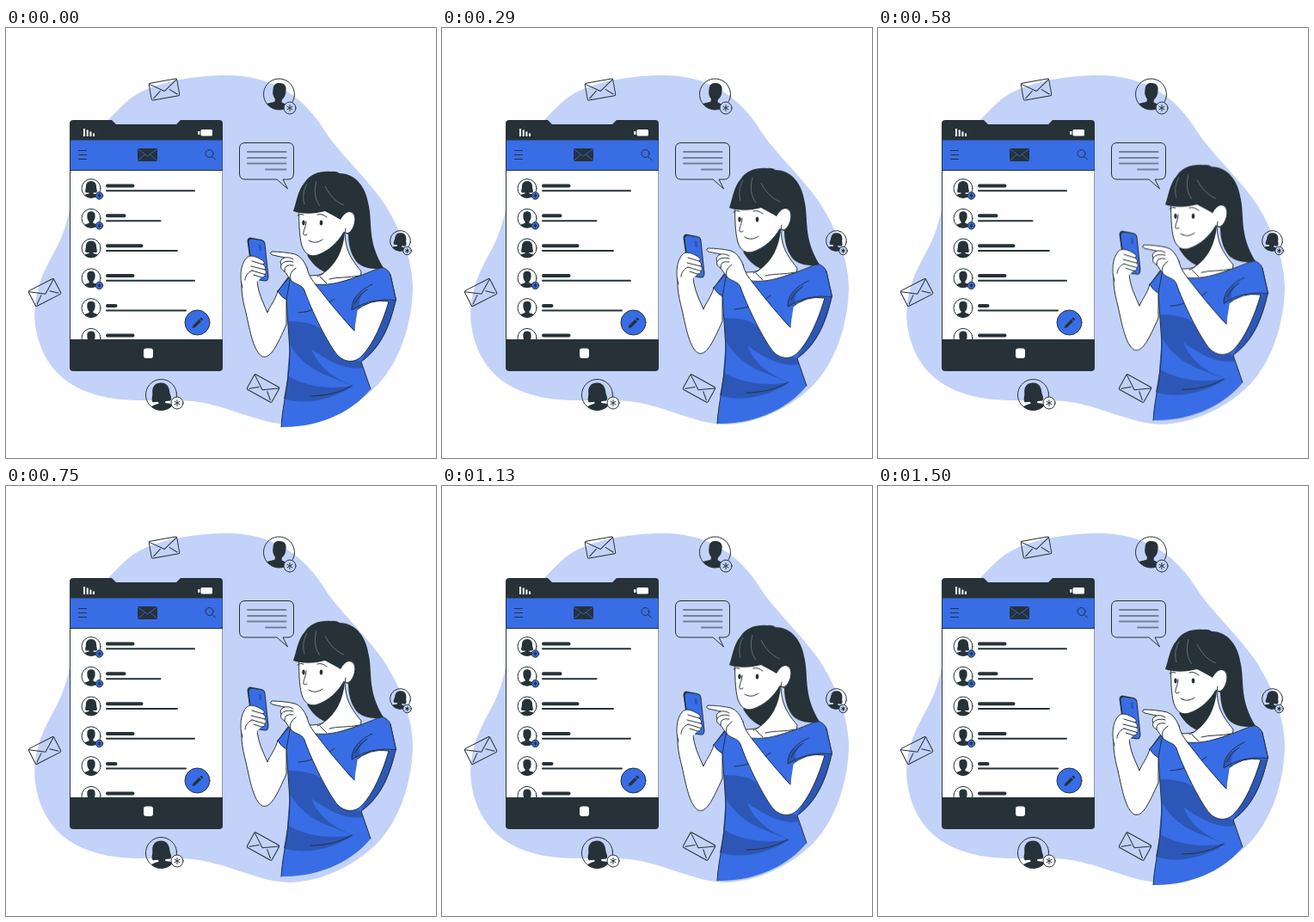
Write an HTML page without scripts that moves like this. It is 500 px wide and 500 px high and loops after 1.54 s.

```html
<!DOCTYPE html>
<html lang="en">
<head>
<meta charset="utf-8">
<title>Mobile inbox</title>
<style>
  html, body { margin: 0; width: 100%; height: 100%; overflow: hidden; background: #fff; }
  svg { display: block; width: 100%; height: 100%; --ink: #263238; --blue: #386de6; --shade: #2c57b6; --pale: #c3d2f8; }
  .ink { fill: var(--ink); }
  .blue { fill: var(--blue); }
  .shade { fill: var(--shade); }
  .pale { fill: var(--pale); }
  .white { fill: #fff; }
  .line { fill: none; }
  .line, .edge { stroke: var(--ink); stroke-width: 1; stroke-linecap: round; stroke-linejoin: round; vector-effect: non-scaling-stroke; }
  .bold { stroke-width: 4; }
  .thin { stroke-width: 2; }
  .woman { animation: float 1540ms linear infinite; }
  @keyframes float {
    0%, 97.4%, 100% { transform: translateY(0); }
    48.7% { transform: translateY(-10px); }
  }
</style>
</head>
<body>
<svg viewBox="0 0 500 500" xmlns="http://www.w3.org/2000/svg">
  <defs>
    <clipPath id="disc"><circle r="18"/></clipPath>
    <clipPath id="screen"><path d="M75 130H252V362H75Z"/></clipPath>
    <g id="man">
      <g clip-path="url(#disc)" class="ink">
        <path d="M-7.500-5C-8-11-4-13 0-13S8-11 7.500-5C8 1 6 4 4 6V9C8 11 12 11 14 14V20H-14V14C-12 11-8 11-4 9V6C-6 4-8 1-7.500-5Z"/>
      </g>
      <circle r="18" class="line"/>
    </g>
    <g id="lady">
      <g clip-path="url(#disc)" class="ink">
        <path d="M0-14C7-14 10-9 10-3C10 2 13 5 10 8L4 8V10C9 11 13 12 14 15V20H-14V15C-13 12-9 11-4 10V8L-10 8C-13 5-10 2-10-3C-10-9-7-14 0-14Z"/>
      </g>
      <circle r="18" class="line"/>
    </g>
    <g id="badge">
      <circle r="7" class="edge"/>
      <path class="line" d="M0-3.500V3.500M-3-1.800L3 1.800M-3 1.800L3-1.800"/>
    </g>
    <g id="letter" class="line">
      <rect x="-16.500" y="-10" width="33" height="20" rx="1.500"/>
      <path d="M-16-9L0 2L16-9M-14 8L-5 1M14 8L6 1"/>
    </g>
  </defs>

  <path class="pale" d="M258 55C305 55 342 76 367 114C383 141 411 165 437 200C461 236 473 272 473 305C471 353 453 400 421 425C396 446 362 460 330 461C292 460 263 440 218 434C180 430 142 438 103 426C66 415 40 389 34 345C30 310 43 284 58 257C77 222 75 190 88 155C98 129 117 107 140 86C162 65 213 55 258 55Z"/>

  <use href="#letter" transform="translate(184 71.500) rotate(-10)"/>
  <use href="#letter" transform="translate(45 307.500) rotate(-27)"/>
  <use href="#letter" transform="translate(299 419) rotate(29)"/>

  <use href="#man" transform="translate(317.500 77) rotate(6)"/>
  <use href="#badge" class="pale" x="330" y="93"/>
  <use href="#lady" transform="translate(180.500 426.500) rotate(-5)"/>
  <use href="#badge" class="white" x="199" y="436"/>
  <use href="#lady" transform="translate(458.500 247.500) scale(.66) rotate(8)"/>
  <use href="#badge" class="pale" transform="translate(466.500 259) scale(.68)"/>

  <!-- speech bubble -->
  <path class="line" d="M278 133.500H328Q334.500 133.500 334.500 140V169Q334.500 176 328 176H322L327.500 187L315 176H278Q271.500 176 271.500 169V140Q271.500 133.500 278 133.500Z"/>
  <path class="line thin" opacity=".5" d="M281 144H325.500M281 151H325.500M281 157.500H325.500M302 164.500H325.500"/>

  <!-- large phone -->
  <path class="ink" d="M78.500 107H123L128 112H198L203 107H248Q252 107 252 111V395Q252 399 248 399H78.500Q74 399 74 395V111Q74 107 78.500 107Z"/>
  <path class="blue" d="M75 130.500H251.500V165H75Z"/>
  <path class="white" d="M75 166H251.500V362H75Z"/>
  <g class="white">
    <path d="M90 117h2v9h-2zM93.700 118.500h2v7.500h-2zM97.400 120.500h2v5.500h-2zM101 122.500h2v3.500h-2z"/>
    <rect x="226.500" y="118" width="13.500" height="7.500" rx="1.500"/>
    <rect x="223" y="120" width="2.500" height="4" rx="1"/>
    <rect x="160" y="372.500" width="11" height="11.500" rx="3"/>
  </g>
  <path class="line" d="M84.500 142.500H93.500M84.500 147.500H93.500M84.500 152.500H93.500M239.500 149.500L244 153.500"/>
  <circle class="line" cx="236.500" cy="146" r="4.500"/>
  <path class="ink" d="M153 140H176V155H153Z"/>
  <path fill="none" stroke="var(--blue)" stroke-width=".8" d="M153 140.500L164.500 149L176 140.500M153 154.500L161.500 147M176 154.500L167.500 147"/>

  <g clip-path="url(#screen)">
    <use href="#lady" transform="translate(99 186.500) scale(.61)"/>
    <use href="#man" transform="translate(99 221.300) scale(.61)"/>
    <use href="#lady" transform="translate(99 256) scale(.61)"/>
    <use href="#man" transform="translate(99 290.800) scale(.61)"/>
    <use href="#man" transform="translate(99 325.600) scale(.61)"/>
    <use href="#man" transform="translate(99 360.400) scale(.61)"/>
  </g>
  <g class="blue">
    <use href="#badge" transform="translate(108.500 195) scale(.6)"/>
    <use href="#badge" transform="translate(108.500 229.800) scale(.6)"/>
    <use href="#badge" transform="translate(108.500 299.400) scale(.6)"/>
  </g>
  <path class="line bold" d="M118 183.500H147.500M118 218.300H137.500M118 253.200H157.500M118 288H147.500M118 323H127.500M118 357.500H147.500"/>
  <path class="line thin" d="M117 189.300H219M117 224.200H179.500M117 259H199M117 293.800H219M117 328.600H209"/>
  <circle class="blue edge" cx="222.500" cy="342.500" r="14.500"/>
  <path class="ink" d="M216.500 349L217.800 345.500L224.500 338.800L227 341.200L220.200 348ZM225.200 338L226.500 336.800Q227.200 336.400 228 337.200L229 338.200Q229.500 339 228.900 339.500L227.700 340.600Z"/>

  <g class="woman">
    <!-- neck and chest -->
    <path class="white edge" d="M394 238C395 254 397 264 413 283L412 292L372 303L343 295L352 288C364 288 371 286 371 282L380 255Z"/>
    <path class="line" d="M371 282C370 285 367 287 362 289M365 289L373 297M376 292C386 289 398 291 411 288"/>
    <path class="ink" d="M350 264C355 273 362 280 371 284C383 275 392 260 394 238L370 258Z"/>

    <!-- dress -->
    <path class="blue" d="M331 286L347 295C360 300 376 299 390 295C408 290 422 284 437 278Q445 281 447 287L453.500 316C447 340 440 368 413 388L424 420C405 444 367 465 320 464C321 440 330 410 330 375L326 316L316 306Z"/>
    <path class="shade" d="M328 341C346 341 359 344 366 350L384 380L413 388L415 395C396 399 372 386 355 373C362 391 376 405 404 416C378 433 348 439 323 431C329 405 331 370 328 341Z"/>
    <path class="blue" d="M330 368C339 384 355 398 378 406L403 416C373 421 346 416 327 404Z"/>
    <path class="shade" d="M318 304L330 288L326 300L327 315ZM445 318L453 317C448 346 434 375 413 388Z"/>
    <path class="line" d="M320 464C321 440 330 410 330 375L326 316M331 286L347 295C360 300 376 299 390 295C408 290 422 284 437 278Q445 281 447 287L453.500 316C447 340 440 368 413 388L424 420M340 331C355 330 369 324 382 315M354 428C372 428 388 424 402 416M316 306L331 286M322 307L332 289"/>

    <!-- left arm -->
    <path class="white edge" d="M316 306C313 317 307 323 304 331C299 319 292 306 292 291L277 286C271 297 275 316 279 331C284 354 288 376 298 382C308 385 315 369 326 345L326 316Z"/>
    <path class="blue edge" d="M316 306L331 288L326 316Q320 313 316 306Z"/>

    <!-- phone in hand -->
    <path class="ink" d="M280.500 248Q280.500 244 284 243.500L297 246Q301 247 301.500 251L305.500 289Q305.500 294.500 301 294.500L291 293Q287 292 286 288Z"/>
    <path class="blue" d="M282.500 249Q282.500 245.500 286 245.500L297 247.300Q300 248 300.500 251L304.500 289Q304.500 293.500 301 293.500L292 292Q288 291 287.500 288Z"/>
    <path class="shade" d="M293.500 251.500L296.500 252L297.300 259L294.500 258.500Z"/>
    <path class="white" d="M273 294C271 285 274 274 279 268C283 263 290 265 298 270Q302 273 299 275Q303 278 301 281Q304 284 301 286.500Q302 290 297 290L292 295L276 302Z"/>
    <path class="line" d="M275 302C271 290 273 275 279 268C283 263 290 265 298 270Q302 273 299 275L286 271M299 275Q303 278 301 281L285 277M301 281Q304 284 301 286.500L286 282M301 286.500Q302 290 297 290L288 287M286 282C281 284 278 289 278 293"/>

    <!-- right arm and pointing hand -->
    <path class="white edge" d="M350 279C352 289 358 296 366 306C379 323 391 337 405 352L405 330Q424 314 445 318C438 342 427 368 414 381C406 390 394 389 386 381C375 369 354 326 347 305C344 298 337 299 331 293L324 283Q318 280 320 275Q317 270 324 267L310 264Q306 262 309 260C317 260 328 261 336 263Q345 266 350 279Z"/>
    <path class="blue" d="M405 352L395 341L402 316L422 300L448 290L453.500 316.500Q424 314 409 326Z"/>
    <path class="shade" d="M402 328C402 316 408 308 420 304C411 311 409 318 412 324Z"/>
    <path class="line" d="M324 267Q330 266 334 269M320 275Q325 269 334 272M324 283Q323 274 334 276M331 293Q328 285 337 279M395 341L405 352M447 287L453.500 316.500Q424 313 402 328C402 314 411 305 426 298M406 320Q411 310 420 304"/>

    <!-- head -->
    <path class="white edge" d="M341 202C340 222 341 243 344 253C347 262 353 267 362 264C374 260 386 250 393 237C399 243 406 231 406 222C405 212 395 210 389 221L378 200Z"/>
    <path class="ink" d="M334 213C338 202 339 189 347 180C354 169 366 166 378 167Q384 166 388 169C407 169 418 186 421 203C427 226 419 246 439 279C425 282 410 278 405 268C399 258 398 247 398 239C405 234 407 224 405 217C402 211 394 213 389 223C384 220 377 216 371 213C360 216 345 217 334 213Z"/>
    <path fill="none" stroke="#73808a" stroke-width=".8" d="M361 178C358 189 359 199 365 207M371 184C376 194 383 202 393 206M350 181C345 190 345 198 347 205"/>
    <path class="line" d="M349 225C349 231 345 237 346 240Q347 242 350 240M352 247C358 251 364 249 368 246M339 218Q342 215 346 217M362 217Q367 215 373 220M395 233C393 237 396 241 399 239"/>
    <g class="ink">
      <ellipse cx="346" cy="226.500" rx="1.700" ry="2.900"/>
      <ellipse cx="366.500" cy="226.500" rx="1.800" ry="3"/>
    </g>
  </g>
</svg>
</body>
</html>
```
